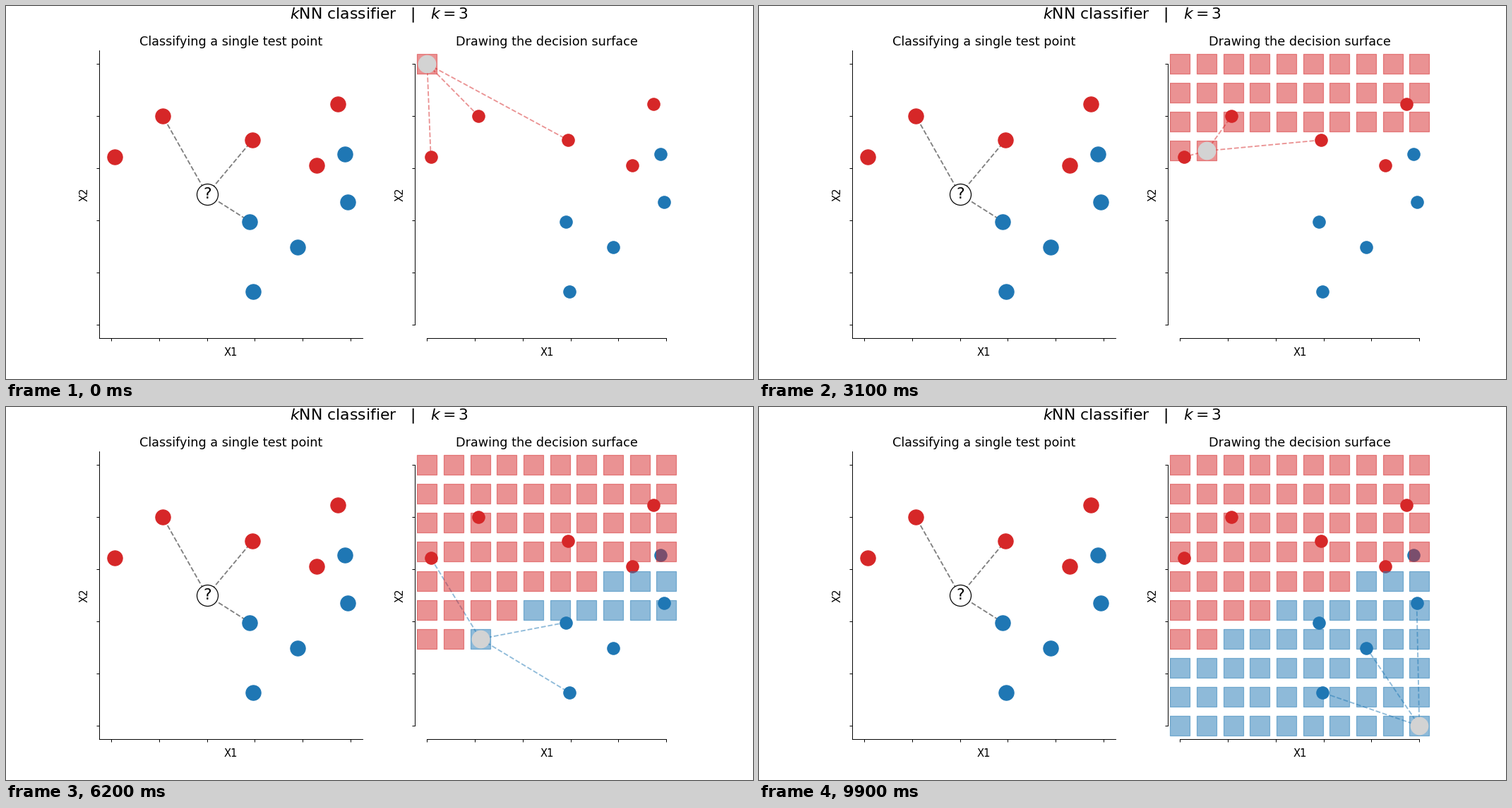
A matplotlib script that plays this animation: 1058 px wide and 529 px high, repeating every 10000 ms.

```python
import numpy as np
import matplotlib.pyplot as plt
from matplotlib.animation import FuncAnimation

K = 3
N = 10
RED, BLUE = "#d62728", "#1f77b4"
COLORS = [RED, BLUE]

points = np.array([
    (0.0155, 0.643), (0.215, 0.800), (0.5895, 0.708), (0.946, 0.845), (0.857, 0.611),
    (0.975, 0.655), (0.989, 0.471), (0.579, 0.396), (0.779, 0.299), (0.594, 0.128),
])
labels = np.array([0] * 5 + [1] * 5)
query = np.array([0.4, 0.5])

# Cells run left to right, top row first.
steps = np.linspace(0, 1, N)
cells = np.array([(x, y) for y in steps[::-1] for x in steps])


def nearest(p):
    return np.argsort(np.hypot(*(points - p).T))[:K]


def classify(p):
    return int(labels[nearest(p)].sum() > K / 2)


classes = np.array([classify(c) for c in cells])


def setup(ax, title):
    ax.set(xlim=(-0.05, 1.05), ylim=(-0.05, 1.05))
    ax.set_title(title)
    ticks = np.linspace(0, 1, 6)
    ax.set_xticks(ticks, [])
    ax.set_yticks(ticks, [])
    ax.set_xlabel("X1")
    ax.set_ylabel("X2")
    ax.spines[["top", "right"]].set_visible(False)


def draw_points(ax, size):
    for c, color in enumerate(COLORS):
        ax.scatter(*points[labels == c].T, s=size, color=color, zorder=2)


plt.rcParams.update({"font.family": "DejaVu Sans", "font.size": 12})
fig, (left, right) = plt.subplots(1, 2, figsize=(12, 6), dpi=1058 / 12)
fig.suptitle("$k$NN classifier   |   $k=3$", fontsize=18, y=1.0)

setup(left, "Classifying a single test point")
draw_points(left, 300)
for i in nearest(query):
    left.plot(*np.array([query, points[i]]).T, "--", color="black", alpha=0.5, zorder=1)
left.scatter(*query, s=600, fc="white", ec="black", lw=1, zorder=3)
left.text(*query, "?", fontsize=18, ha="center", va="center", zorder=4)

setup(right, "Drawing the decision surface")
right.spines[["left", "bottom"]].set_bounds(0, 1)
draw_points(right, 200)
links = [right.plot([], [], "--", alpha=0.5, zorder=1)[0] for _ in range(K)]
squares = [right.scatter([], [], s=500, marker="s", color=c, alpha=0.5, zorder=3)
           for c in COLORS]
cursor = right.scatter([], [], s=400, color="lightgray", zorder=4)


def update(n):
    here = cells[n]
    for c, sq in enumerate(squares):
        sq.set_offsets(cells[:n + 1][classes[:n + 1] == c])
    for link, i in zip(links, nearest(here)):
        link.set_data(*np.array([here, points[i]]).T)
        link.set_color(COLORS[classes[n]])
    cursor.set_offsets([here])
    return [*links, *squares, cursor]


anim = FuncAnimation(fig, update, frames=N * N, interval=100, repeat=True,
                     repeat_delay=0, init_func=lambda: update(0))
plt.show()
```
